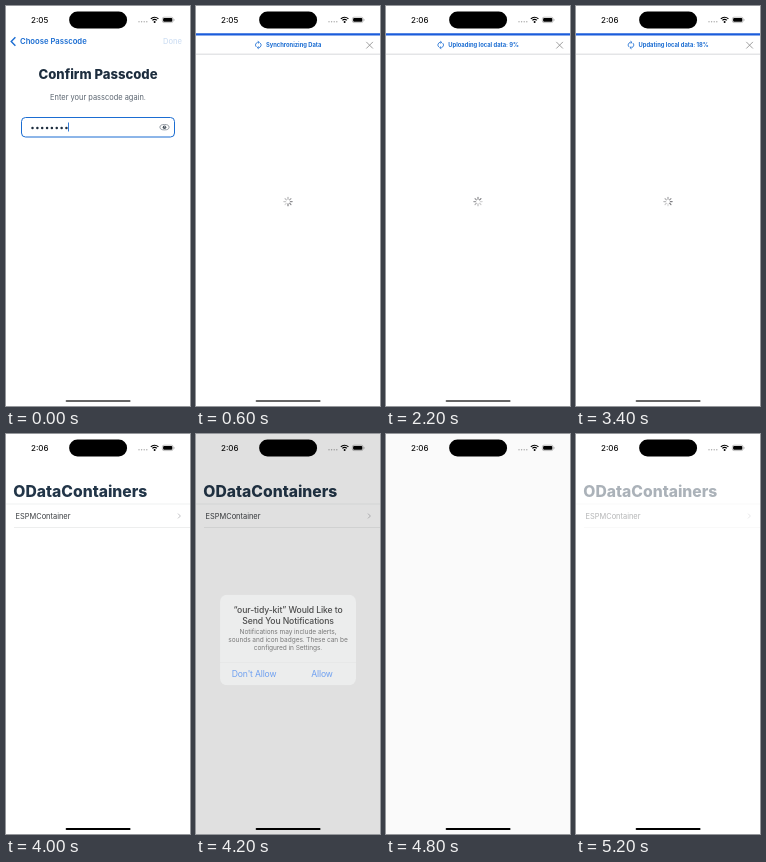
Write an HTML page with a canvas that moves like this. It is 184x400 px and loops after 5.4 s.

```html
<!DOCTYPE html>
<html lang="en">
<head>
<meta charset="utf-8">
<title>Onboarding</title>
<style>
html, body { margin: 0; width: 100%; height: 100%; overflow: hidden; background: #fff; }
canvas { display: block; width: 184px; height: 400px; }
</style>
</head>
<body>
<canvas id="stage"></canvas>
<script>
const W = 184, H = 400, LOOP = 5400, STEP = 200;
const FONT = 'Inter, "Liberation Sans", sans-serif';
const BLUE = '#1b6dd2', NAVY = '#223548';
const canvas = document.getElementById('stage');
const c = canvas.getContext('2d');
const ratio = window.devicePixelRatio || 1;
canvas.width = W * ratio;
canvas.height = H * ratio;

// [start ms, message]
const messages = [
  [0, 'Synchronizing Data'],
  [1800, 'Uploading local data: 0%'],
  [2200, 'Uploading local data: 9%'],
  [2400, 'Uploading local data: 100%'],
  [2600, 'Updating local data: 0%'],
  [3000, 'Updating local data: 9%'],
  [3400, 'Updating local data: 18%'],
  [3600, 'Updating local data: 100%']
];

// Linear interpolation through [time, value] points
function track(t, points) {
  if (t <= points[0][0]) return points[0][1];
  for (let i = 1; i < points.length; i++) {
    const [t0, a] = points[i - 1], [t1, b] = points[i];
    if (t <= t1) return a + (b - a) * (t - t0) / (t1 - t0);
  }
  return points[points.length - 1][1];
}

function text(str, x, y, style, color, align = 'left', spacing = 0) {
  c.font = style + ' ' + FONT;
  c.fillStyle = color;
  c.textAlign = align;
  c.letterSpacing = spacing + 'px';
  c.fillText(str, x, y);
}

function box(x, y, w, h, r, color) {
  c.fillStyle = color;
  c.beginPath();
  c.roundRect(x, y, w, h, r);
  c.fill();
}

function dot(x, y, r, color) {
  c.fillStyle = color;
  c.beginPath();
  c.arc(x, y, r, 0, 7);
  c.fill();
}

function line(pts, color, width) {
  c.strokeStyle = color;
  c.lineWidth = width;
  c.beginPath();
  pts.forEach(([x, y]) => c.lineTo(x, y));
  c.stroke();
}

function faded(alpha, draw) {
  if (alpha <= 0) return;
  c.save();
  c.globalAlpha = alpha;
  draw();
  c.restore();
}

function statusBar(t) {
  text(t < 1800 ? '2:05' : '2:06', 25, 16.9, '500 8px', '#111');
  for (let i = 0; i < 4; i++) dot(133 + i * 2.6, 15.7, 0.7, '#aaa');
  c.strokeStyle = '#000';
  c.lineWidth = 1.1;
  for (const r of [3, 5.2]) {
    c.beginPath();
    c.arc(148.6, 16.4, r, -Math.PI * 0.76, -Math.PI * 0.24);
    c.stroke();
  }
  dot(148.6, 15.9, 1, '#000');
  c.strokeStyle = '#999';
  c.lineWidth = 0.6;
  c.beginPath();
  c.roundRect(156.3, 11.2, 10.8, 5.4, 1.7);
  c.stroke();
  box(157.1, 12, 9.2, 3.8, 1, '#000');
  box(167.7, 13, 0.7, 1.8, 0.3, '#999');
}

function passcode(t) {
  line([[9.4, 31.2], [5.2, 35.5], [9.4, 39.8]], BLUE, 1.4);
  text('Choose Passcode', 14, 38.4, '600 7.7px', BLUE);
  text('Done', 176, 38.4, '500 7.6px', '#cfdff3', 'right');
  text('Confirm Passcode', 92, 73, '800 13.1px', '#1d2d3e', 'center');
  text('Enter your passcode again.', 92, 94, '7.45px', '#5b6570', 'center');
  c.strokeStyle = BLUE;
  c.lineWidth = 1;
  c.beginPath();
  c.roundRect(15.5, 111.5, 153, 19.5, 4);
  c.stroke();
  for (let i = 0; i < 8; i++) dot(26.5 + i * 4.85, 122, 1.25, '#1d2d3e');
  if (t < 200) box(62, 116.5, 0.9, 9, 0, BLUE);
  c.strokeStyle = '#7b858f';
  c.lineWidth = 0.8;
  c.beginPath();
  c.ellipse(158.5, 121.2, 4.6, 2.7, 0, 0, 7);
  c.stroke();
  dot(158.5, 121.2, 1.8, '#46515c');
  dot(158.8, 120.8, 0.6, '#fff');
}

function syncIcon(x, y) {
  c.strokeStyle = BLUE;
  c.lineWidth = 0.8;
  for (const side of [0, Math.PI]) {
    c.save();
    c.translate(x, y);
    c.rotate(side);
    c.beginPath();
    c.arc(0, 0, 2.8, Math.PI * 0.75, Math.PI * 1.6);
    c.stroke();
    line([[-0.5, -3.9], [1.1, -2.6], [-0.4, -1.5]], BLUE, 0.7);
    c.restore();
  }
}

function spinner(t) {
  const head = Math.floor(t / 125) % 8;
  c.save();
  c.translate(92, 195.6);
  c.lineCap = 'round';
  for (let i = 0; i < 8; i++) {
    const age = (head - i + 8) % 8;
    c.save();
    c.rotate(i * Math.PI / 4);
    line([[0, -2.3], [0, -4.2]], `rgba(90,90,95,${0.85 - age * 0.085})`, 1.1);
    c.restore();
  }
  c.restore();
}

function syncBar(t) {
  const msg = messages.filter(m => m[0] <= t).pop()[1];
  const style = '700 5.8px';
  box(0, 27.3, W, 2.2, 0, '#1b5cdb');
  box(0, 47.7, W, 0.8, 0, '#c9cccf');
  c.font = style + ' ' + FONT;
  c.letterSpacing = '0px';
  const left = 92 - (c.measureText(msg).width + 11.3) / 2;
  syncIcon(left + 3.7, 39);
  text(msg, left + 11.3, 41.2, style, BLUE);
  line([[170.3, 35.9], [176.9, 42.5]], '#888', 0.8);
  line([[176.9, 35.9], [170.3, 42.5]], '#888', 0.8);
}

function list() {
  text('ODataContainers', 7.3, 63, '800 15.7px', NAVY);
  box(0, 69.8, W, 0.4, 0, '#e0e1e2');
  text('ESPMContainer', 9.5, 84.8, '7.45px', '#3a3d40');
  line([[172, 79.6], [174.4, 82], [172, 84.4]], '#b4b4b8', 0.8);
  box(8, 93.1, W - 8, 0.4, 0, '#dcddde');
}

function alertBox(t) {
  const scale = track(t, [[4200, 1.079], [4400, 1.015], [4600, 1]]);
  c.save();
  c.translate(92, 206);
  c.scale(scale, scale);
  c.translate(-92, -206);
  c.beginPath();
  c.roundRect(29, 164, 126, 84, 6.5);
  c.clip();
  box(29, 164, 126, 84, 0, '#f1f2f2');
  if (t >= 4600) box(92, 227, 63, 21, 0, '#dcdddd');
  box(29, 226.8, 126, 0.4, 0, '#cfd0d1');
  const bold = '500 8px', small = '6.09px', button = '8px', blue = '#3a80f2';
  text('“our-tidy-kit” Would Like to', 92, 181, bold, '#0a0a0a', 'center', -0.1);
  text('Send You Notifications', 92, 191, bold, '#0a0a0a', 'center', -0.1);
  ['Notifications may include alerts,', 'sounds and icon badges. These can be', 'configured in Settings.']
    .forEach((s, i) => text(s, 92, 200.6 + i * 7.4, small, '#484848', 'center', -0.065));
  text("Don't Allow", 60.5, 240.3, button, blue, 'center', -0.16);
  text('Allow', 123.5, 240.3, button, blue, 'center', -0.16);
  c.restore();
}

function render(t) {
  c.setTransform(ratio, 0, 0, ratio, 0, 0);
  c.fillStyle = '#fff';
  c.fillRect(0, 0, W, H);
  faded(track(t, [[0, 1], [200, 0.55], [400, 0]]), () => passcode(t));
  if (t >= 400 && t < 3800) {
    spinner(t);
    if (t >= 600) syncBar(t);
  }
  const listAlpha = track(t, [[3600, 0], [3800, 0.4], [4000, 1], [4200, 1], [4400, 0.4], [4600, 0], [5000, 0], [5200, 0.38]]);
  faded(listAlpha, list);
  statusBar(t);
  box(59.6, 393.9, 65, 2.1, 1.05, t < 3800 ? '#666' : '#000');
  const dim = track(t, [[4000, 0], [4200, 0.12], [4400, 0.185], [4600, 0.2], [4800, 0.02], [5000, 0]]);
  faded(dim, () => box(0, 0, W, H, 0, '#000'));
  box(63.1, 5.6, 58, 16.8, 8.4, '#000');
  const alertAlpha = track(t, [[4000, 0], [4200, 0.7], [4400, 0.95], [4600, 1], [4800, 0]]);
  faded(alertAlpha, () => alertBox(t));
}

const start = performance.now();
function tick() {
  const t = (performance.now() - start) % LOOP;
  render(Math.floor(t / STEP) * STEP);
  requestAnimationFrame(tick);
}
tick();
</script>
</body>
</html>
```
